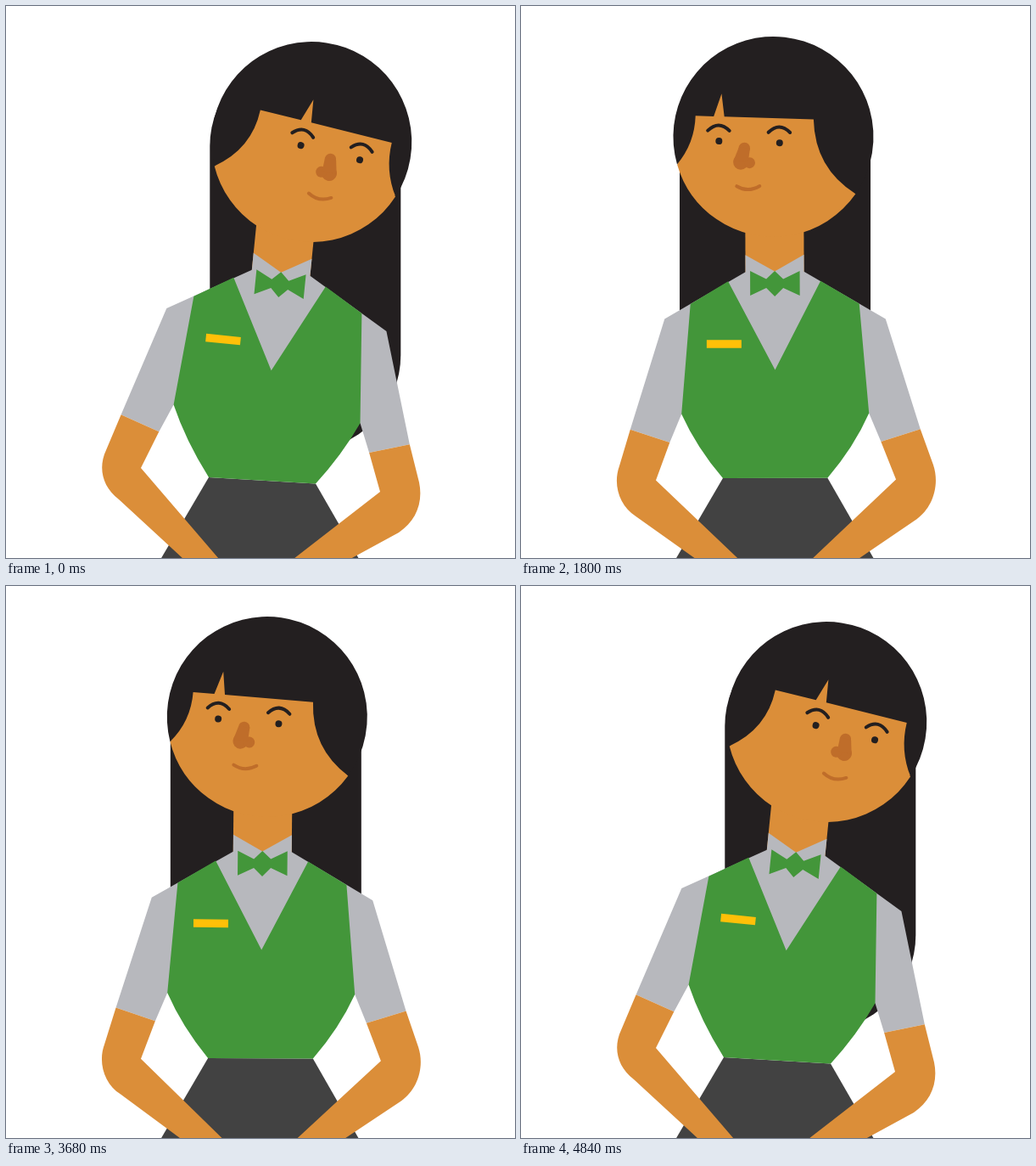
An HTML page with a canvas that plays this animation: 600x650 px, repeating every 5360 ms.

```html
<!DOCTYPE html>
<html lang="en">
<head>
<meta charset="utf-8">
<title>Hostess</title>
<style>
html, body { margin: 0; width: 100%; height: 100%; overflow: hidden; background: #fff; }
canvas { display: block; width: 600px; height: 650px; }
</style>
</head>
<body>
<canvas id="stage" width="600" height="650"></canvas>
<script>
const ctx = document.getElementById('stage').getContext('2d');
const LOOP = 5360, STEP = 40, RAD = Math.PI / 180;
const SKIN = '#db8e39', HAIR = '#231f20', VEST = '#43963a', SHIRT = '#b7b8bd',
      SKIRT = '#424242', TAG = '#ffc008', LIP = '#bf6d2a';
const LEAN = 5.7, REST = -0.22;          // body angle at both ends, degrees
const R = 118;                           // head radius

const mix = (a, b, k) => a + (b - a) * k;
const clamp = v => Math.min(1, Math.max(0, v));
const span = (t, from, to) => clamp((t - from) / (to - from));

// CSS-like cubic-bezier easing, solved by bisection
function bezier(x1, y1, x2, y2) {
  const at = (a, b, s) => 3 * s * (1 - s) * (1 - s) * a + 3 * s * s * (1 - s) * b + s * s * s;
  return u => {
    if (u <= 0 || u >= 1) return clamp(u);
    let lo = 0, hi = 1;
    for (let i = 0; i < 30; i++) {
      const mid = (lo + hi) / 2;
      if (at(x1, x2, mid) < u) lo = mid; else hi = mid;
    }
    return at(y1, y2, lo);
  };
}
const settle = bezier(0.13, 0.1, 0.2, 1);
const swing = bezier(0.7, 0, 0.4, 1);
const nod = bezier(0.33, 0, 0.67, 1);

function poseAt(t) {
  if (t < 1200) {
    const k = settle(t / 1200);
    return { body: mix(LEAN, REST, k), head: mix(13.8, -0.5, k), blink: t >= 280 && t < 520 };
  }
  if (t < 3080) return { body: REST, head: mix(-0.5, 3.3, nod(span(t, 1320, 2200))) };
  const k = swing(span(t, 3080, 4840));
  return { body: mix(REST, LEAN, k), head: mix(3.3, 13.8, k) };
}

function fill(color, draw) {
  ctx.beginPath();
  draw();
  ctx.closePath();
  ctx.fillStyle = color;
  ctx.fill();
}
const poly = (color, ...pts) => fill(color, () => pts.forEach(p => ctx.lineTo(...p)));
const dot = (color, x, y, r) => fill(color, () => ctx.arc(x, y, r, 0, 7));

function line(color, width, draw) {
  ctx.beginPath();
  draw();
  ctx.lineWidth = width;
  ctx.lineCap = 'round';
  ctx.strokeStyle = color;
  ctx.stroke();
}
const curve = (color, width, x, y, cx, cy, x2, y2) => line(color, width, () => {
  ctx.moveTo(x, y);
  ctx.quadraticCurveTo(cx, cy, x2, y2);
});

// Rotates a point of the upright torso around the waist
function turner(deg) {
  const c = Math.cos(deg * RAD), s = Math.sin(deg * RAD);
  return (x, y) => [300 + (x - 300) * c - (y - 556) * s, 556 + (x - 300) * s + (y - 556) * c];
}

function drawBackHair(deg) {
  const x = 301.5 + deg * 9;
  fill(HAIR, () => {
    ctx.arc(x, 165, 112.5, Math.PI, 0);
    ctx.arc(x, 411, 112.5, 0, Math.PI);
  });
}

function drawTorso(at, t) {
  const m = (a, b) => mix(a, b, t);
  const hipL = [m(238, 239), m(556, 555)], hipR = [m(361.5, 365), m(556, 562.5)];

  poly(SKIN, at(265.5, 240), at(334.5, 240), at(334.5, 318), at(265.5, 318));
  poly(SHIRT, at(265.5, 293), at(300, 312.5), at(334.5, 293), at(334.5, 313), at(430.5, 369),
    at(471, 499), at(424.5, 513.5), at(410.5, 480), at(300, 500), at(189.5, 480),
    at(175.5, 513.5), at(129, 498), at(170, 368), at(265.5, 313));
  poly(SKIRT, hipL, hipR, [416, 651], [182.5, 651]);
  fill(VEST, () => {
    [[200.5, 350.5], [245, 324], [300, 428.5], [354, 324], [399.5, 351], [410.5, 480]]
      .forEach(p => ctx.lineTo(...at(...p)));
    ctx.quadraticCurveTo(...at(392.5, 520), ...hipR);
    ctx.lineTo(...hipL);
    ctx.quadraticCurveTo(...at(207.5, 520), ...at(189.5, 480));
  });
  poly(VEST, at(271, 312), at(290, 321.5), at(300, 312), at(310, 321.5), at(329.5, 312),
    at(329.5, 341), at(310, 332), at(300, 342), at(290, 332), at(271, 341));
  poly(TAG, at(219.5, 393), at(260.5, 393), at(260.5, 402.5), at(219.5, 402.5));

  fill(SKIN, () => {
    ctx.moveTo(...at(129, 498));
    ctx.lineTo(m(116, 118), m(541, 523));
    ctx.bezierCurveTo(m(108, 108.5), m(563, 543), m(116, 113), m(588, 566), m(135, 133), m(600, 581));
    ctx.lineTo(m(206, 209), 651);
    ctx.lineTo(m(256, 251), 651);
    ctx.lineTo(159, m(558, 544));
    ctx.lineTo(...at(175.5, 513.5));
  });
  fill(SKIN, () => {
    ctx.moveTo(...at(471, 499));
    ctx.lineTo(m(486, 487), m(541, 561));
    ctx.bezierCurveTo(m(494, 492), m(565, 585), m(485, 483), m(592, 607), m(466, 463), m(605, 620));
    ctx.lineTo(m(398, 406), 651);
    ctx.lineTo(m(343, 339), 651);
    ctx.lineTo(m(442, 441), m(558, 572));
    ctx.lineTo(...at(424.5, 513.5));
  });
}

function drawNose(t) {
  const x = -31.5 + 58 * t, lx = -35 + 64 * t, nx = -24.5 + 65 * t - 21 * t * t;
  dot(LIP, x, 14.5, 6.7);
  dot(LIP, lx, 31, 9);
  dot(LIP, nx, 31.5, 6.5);
  poly(LIP, [x - 6.7, 14], [x + 6.7, 14], [lx + 8.7, 30], [lx - 8.7, 30]);
}

function drawHead(at, deg, t, blink) {
  const m = (a, b) => mix(a, b, t);
  const right = m(32.6, 19.2) * RAD, left = m(162, 152.3) * RAD;
  const shift = 50.7 * t;

  ctx.save();
  ctx.translate(...at(300, 244));
  ctx.rotate(deg * RAD);
  ctx.translate(-3.5 + 11.5 * t, -90);

  // The upper skin edge stays just inside the hair
  fill(SKIN, () => {
    ctx.arc(0, 0, R, right, left);
    ctx.arc(0, 0, R - 1, left, right + 2 * Math.PI);
  });
  fill(HAIR, () => {
    ctx.arc(0, 0, R, left, right + 2 * Math.PI);
    ctx.quadraticCurveTo(m(51.5, 92), m(35, 12), m(48.5, 92), -21.7);
    ctx.lineTo(shift - 56.5, -22);
    ctx.lineTo(shift - 60.5, -49);
    ctx.lineTo(shift - 69, -22);
    ctx.lineTo(m(-91.5, -67.6), -22);
    ctx.quadraticCurveTo(m(-91.5, -66.4), m(11, 25), R * Math.cos(left), R * Math.sin(left));
  });

  for (const x of [shift - 62, shift + 9.5]) {
    curve(HAIR, 4, x - 13.5, -5, x - 1, -18, x + 12, -5.5);
    if (blink) line(HAIR, 3, () => ctx.arc(x, 5, 4.3, 0, Math.PI));
    else dot(HAIR, x, 7, 4);
  }
  drawNose(t);
  curve(LIP, 4, shift - 39.5, 59.5, shift - 26, 67, shift - 12.5, 58.5);
  ctx.restore();
}

function frame(now) {
  const time = Math.floor((now % LOOP) / STEP) * STEP;
  const { body, head, blink } = poseAt(time);
  const at = turner(body), t = body / LEAN;
  ctx.fillStyle = '#fff';
  ctx.fillRect(0, 0, 600, 650);
  drawBackHair(body);
  drawTorso(at, t);
  drawHead(at, head, t, blink);
}

const start = performance.now();
(function tick() {
  frame(performance.now() - start);
  requestAnimationFrame(tick);
})();
</script>
</body>
</html>
```
